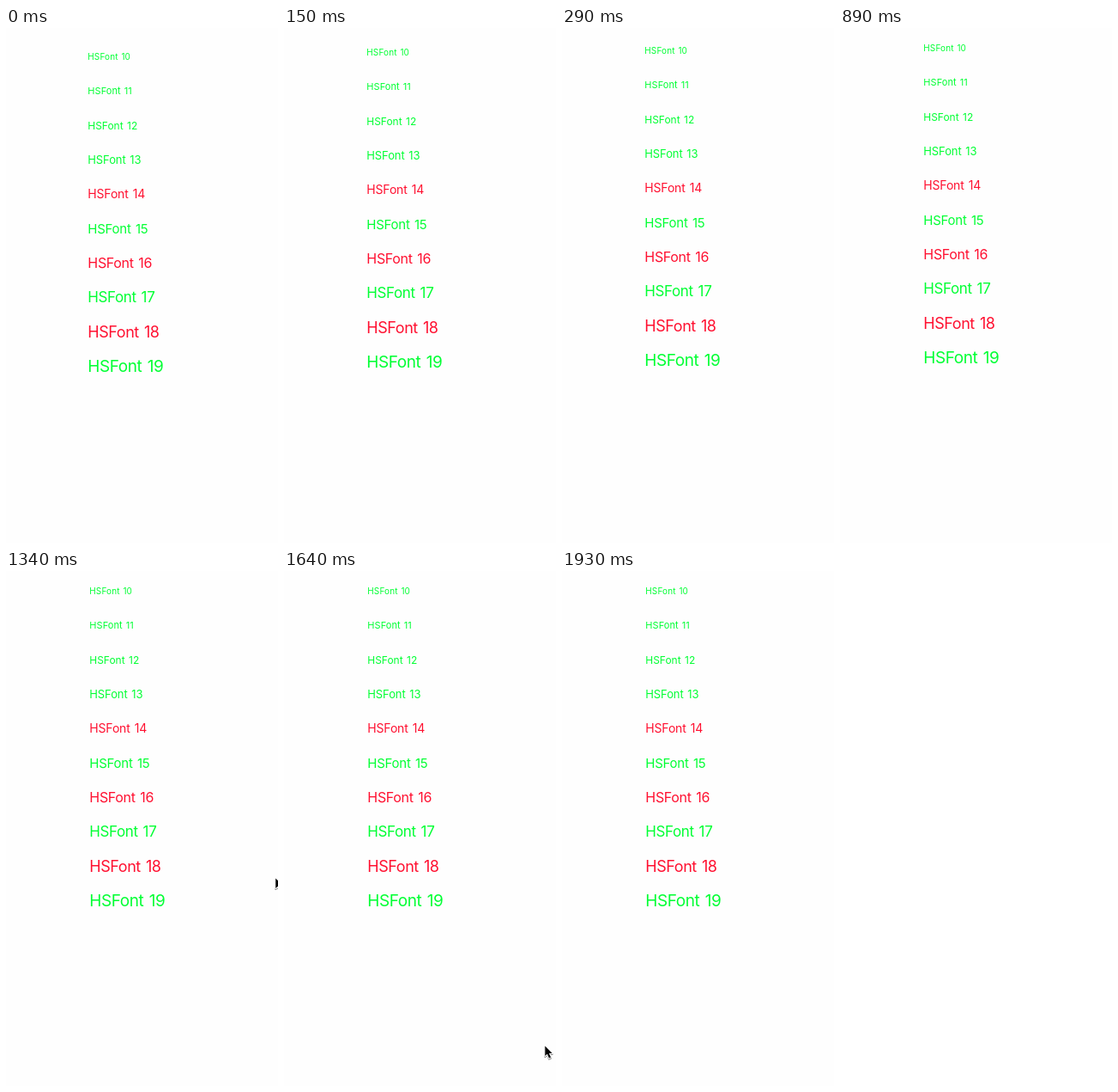
An HTML page for the animation above (2230 ms loop, 317 by 599 pixels).

```html
<!DOCTYPE html>
<html lang="en">
<head>
<meta charset="utf-8">
<title>Font sizes</title>
<style>
  html, body { margin: 0; width: 100%; height: 100%; overflow: hidden; background: #fefefe; }
  svg { display: block; }
  text { font-family: Inter, Roboto, sans-serif; word-spacing: .09em; }
  #pointer { filter: drop-shadow(0 1px .7px rgba(0, 0, 0, .5)); }
</style>
</head>
<body>
<svg width="317" height="599" viewBox="0 0 317 599">
  <g id="list"></g>
  <g id="pointer" visibility="hidden">
    <path d="M2.3 1.4V13L4.8 10.7L6.9 15.6L9 14.7L6.9 9.9H10.6Z" fill="#000"
          stroke="#fff" stroke-width="2" paint-order="stroke" stroke-linejoin="round"/>
  </g>
</svg>
<script>
const LOOP = 2230;
const list = document.getElementById('list');
const pointer = document.getElementById('pointer');

for (let size = 10; size < 20; size++) {
  const row = size - 10;
  const label = document.createElementNS('http://www.w3.org/2000/svg', 'text');
  label.textContent = 'HSFont ' + size;
  label.setAttribute('x', 95.3);
  label.setAttribute('y', 33.2 + 40 * row + .364 * size);
  label.setAttribute('font-size', size);
  // Larger sizes are set tighter
  label.setAttribute('letter-spacing', Math.max(-.45, .12 - .072 * row));
  label.setAttribute('fill', size >= 14 && size % 2 === 0 ? '#ff1030' : '#00ff33');
  list.append(label);
}

// Held positions: [start ms, distance]
const lifts = [[0, 0], [150, 5], [290, 7], [890, 10]];
const drops = [[1340, 356], [1490, 457], [1640, 551], [1780, 594]];

const held = (steps, t) => steps.findLast(([start]) => start <= t)?.[1];

function move(node, x, y) {
  node.setAttribute('transform', `translate(${x} ${y})`);
}

const start = performance.now();
function draw(now) {
  const t = Math.max(0, now - start) % LOOP;
  const lift = held(lifts, t);
  move(list, Math.round(lift / 5), -lift);

  const y = held(drops, t);
  const shown = y !== undefined && t < 1930;
  pointer.setAttribute('visibility', shown ? 'visible' : 'hidden');
  if (shown) move(pointer, 300 + Math.round(12 * ((594 - y) / 238) ** 1.2), y);

  requestAnimationFrame(draw);
}
draw(start);
</script>
</body>
</html>
```
